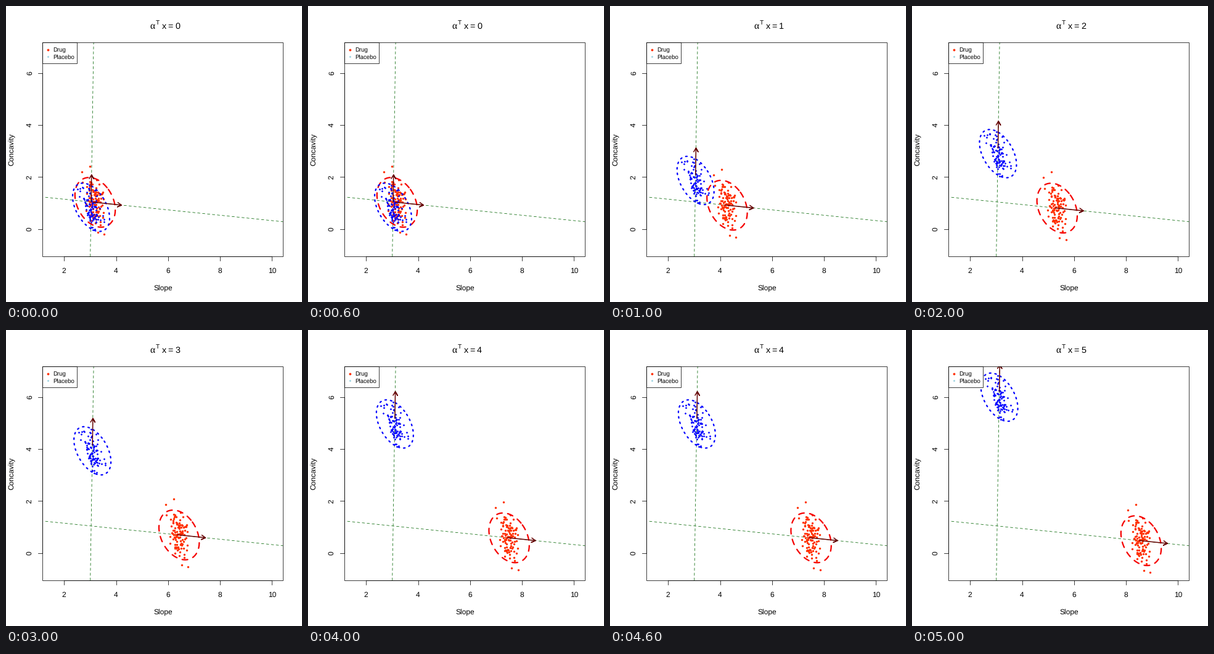
Recreate the animation shown at these times as a matplotlib script. Size 480 by 480 pixels, loop 6000 ms.

```python
import numpy as np
import matplotlib.pyplot as plt
from matplotlib.animation import FuncAnimation
from matplotlib.patches import Rectangle

SIZE = 480
PX = 0.72  # points per pixel at 100 dpi
LEFT, RIGHT, TOP, BOTTOM = 59, 449, 59, 406
UNIT = 42.15
FRAMES = 6

ARROW = "#640000"
RED = "#ff3000"
BLUE = "#0000ff"

plt.rcParams.update({"font.family": "Liberation Sans", "text.hinting": "none"})
fig = plt.figure(figsize=(4.8, 4.8), dpi=100, facecolor="white")
ax = fig.add_axes([LEFT / SIZE, 1 - BOTTOM / SIZE,
                   (RIGHT - LEFT) / SIZE, (BOTTOM - TOP) / SIZE])
ax.set_xlim(LEFT, RIGHT)
ax.set_ylim(BOTTOM, TOP)
ax.axis("off")


def line(x, y, color="black", width=0.75, clip=False, **kw):
    return ax.plot(x, y, color=color, lw=width * PX, clip_on=clip, **kw)[0]


def dashed(x, y, color, width, on, off, **kw):
    unit = max(width, 1) / width  # dashes scale with line width, at least 1 px
    return line(x, y, color, width, True, dash_capstyle="round",
                linestyle=(0, (on * unit, off * unit)), **kw)


def box(w, h, **kw):
    ax.add_patch(Rectangle((LEFT, TOP), w, h, ec="black", lw=0.75 * PX,
                           clip_on=False, **kw))


def label(x, y, text, size=12, ha="center", **kw):
    return ax.text(x, y, text, fontsize=size * PX, ha=ha, va="baseline",
                   rotation_mode="anchor", **kw)


def ellipse(w, h, rho):
    t = np.linspace(0, 2 * np.pi, 200)
    half = np.arccos(-rho) / 2
    return np.column_stack([w * np.cos(t + half), -h * np.cos(t - half)])


def cloud(seed, n, sd, slope, reach, extra):
    """Points scattered about a steep line, plus a few extremes."""
    rng = np.random.default_rng(seed)
    y = rng.normal(0, 20, 4 * n)
    y = y[abs(y) < reach][:n]
    x = slope * y + sd * rng.normal(size=y.size).clip(-2.3, 2.3)
    return np.vstack([np.column_stack([x, y]), extra])


def arrow_path(tail, step, head=7.2):
    tip = tail + step
    back = np.arctan2(-step[1], -step[0])
    barbs = [tip + head * np.array([np.cos(back + a), np.sin(back + a)])
             for a in (-np.pi / 6, np.pi / 6)]
    return np.array([tail, tip, barbs[0], tip, barbs[1]])


class Group:
    """Dots, ring and arrow that advance by one step per frame."""

    def __init__(self, centre, tail, step, pts, ring, marker, size,
                 colors, dash, z):
        self.centre, self.tail, self.step = map(np.array, (centre, tail, step))
        self.pts, self.ring = pts, ring
        self.dots = line([], [], colors[0], 0, True, marker=marker,
                         ms=size * PX, mew=0, linestyle="none", zorder=z)
        self.curve = dashed([], [], colors[1], 2.25, *dash, zorder=z + 2)
        self.arrow = line([], [], ARROW, 1.5, True, zorder=8,
                          solid_joinstyle="round", solid_capstyle="round")

    def move(self, k):
        shift = k * self.step
        arrow = arrow_path(self.tail + shift, self.step)
        self.dots.set_data(*(self.pts + self.centre + shift).T)
        self.curve.set_data(*(self.ring + self.centre + shift).T)
        self.arrow.set_data(*arrow.T)
        return [self.dots, self.curve, self.arrow]


# Discriminant directions
dashed([64, RIGHT], [310.2, 349.8], "darkgreen", 0.75, 4, 4, zorder=1)
dashed([136.7, 142.1], [BOTTOM, TOP], "darkgreen", 0.75, 4, 4, zorder=1)

drug = cloud(4, 98, 7, 0.13, 38,
             [(-9, -58.5), (-22, -49.5), (4, 48.5), (14.5, 51.5)])
placebo = cloud(12, 96, 7, 0.2, 37, [(-22.5, -29.5), (21, 20)])
groups = [
    Group((144.5, 318.4), (141.8, 318.2), (45.4, 4.65), drug,
          ellipse(32.7, 40.3, 0.3), "o", 3.4, (RED, "#f50000"), (4, 4), 2),
    Group((138, 326.4), (138, 317.3), (0.72, -43.5), placebo,
          ellipse(30, 39.1, 0.45), "D", 2.5, (BLUE, BLUE), (1, 3), 3),
]

# Frame, axes and labels
box(RIGHT - LEFT, BOTTOM - TOP, fill=False, zorder=10)
xs = 94.2 + UNIT * np.arange(0, 9, 2)
ys = 361.6 - UNIT * np.arange(0, 7, 2)
line(xs[[0, -1]], [BOTTOM] * 2, zorder=10)
line([LEFT] * 2, ys[[0, -1]], zorder=10)
for i, x in enumerate(xs):
    line([x, x], [BOTTOM, BOTTOM + 7.2])
    label(x, 433.2, str(2 * i + 2))
for i, y in enumerate(ys):
    line([LEFT - 7.2, LEFT], [y, y])
    label(41.8, y, str(2 * i), rotation=90)
label(254.4, 462, "Slope")
label(12.8, 233, "Concavity", rotation=90)

# Legend
box(56, 34, fc="white", zorder=9)
for y, text, color, marker, size in [(70.5, "Drug", RED, "o", 3.8),
                                     (82, "Placebo", "#9ed3e1", "D", 2.6)]:
    line([67.6], [y], color, marker=marker, ms=size * PX, mew=0, zorder=11)
    label(76, y + 3.6, text, 9.6, "left", zorder=11)

# Title
label(233.6, 37, "α", 15.5, "left", family="Liberation Serif")
label(243.2, 30.3, "T", 10.1, "left")
label(252.9, 37, "x", 14.4, "left")
label(262.7, 37, "=", 14.4, "left")
digit = label(274, 37, "0", 14.4, "left")


def draw(k):
    digit.set_text(str(k))
    return [digit] + [a for g in groups for a in g.move(k)]


anim = FuncAnimation(fig, draw, frames=FRAMES, init_func=lambda: draw(0),
                     interval=1000, repeat=True, repeat_delay=0, blit=False)
plt.show()
```
